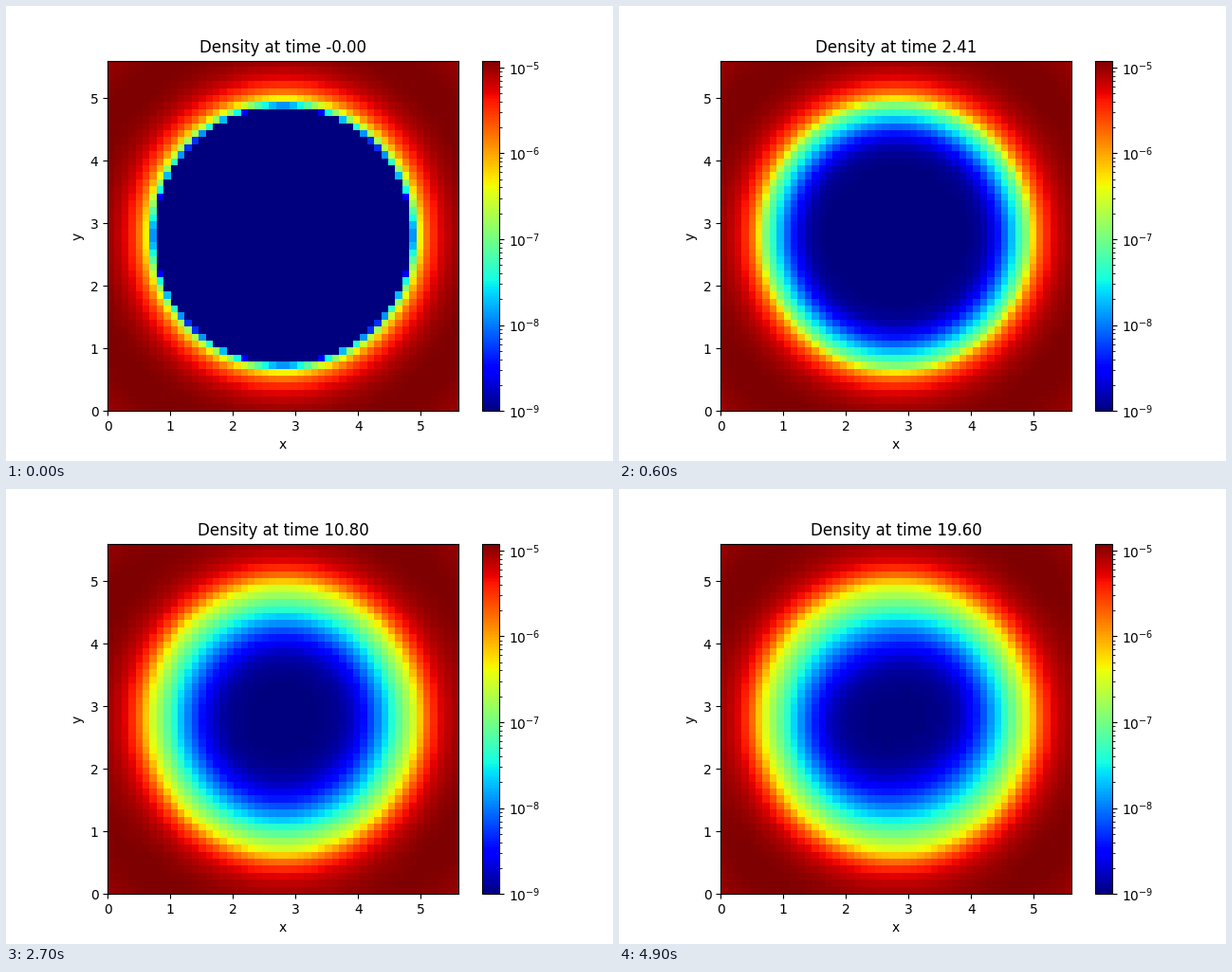
Animation, 640 px wide and 480 px high, one loop 5 s. Source, as a matplotlib script:

```python
import numpy as np
import matplotlib.pyplot as plt
from matplotlib.animation import FuncAnimation
from matplotlib.colors import LogNorm

SIZE, CELLS, FRAMES = 5.6, 50, 50
FLOOR, PEAK = 1e-9, 1.2e-5
R_IN, R_PEAK = 2.033, 3.27          # inner edge and pressure maximum of the torus
R_EDGE, CELL = 2.072, SIZE / CELLS
STEP = 0.4 / 25.5915                # solver time step

# Time, log density at the inner edge, and its inward drop per cell
TIMES = [0, 0.4, 0.81, 2.41, 5.61, 10.8, 15.61, 19.6]
EDGE_LOG = [-14, -7.30, -7.16, -6.96, -6.67, -6.55, -6.52, -6.51]
DROP = [0.50, 0.48, 0.43, 0.40, 0.335, 0.289, 0.275, 0.2675]

axis = (np.arange(CELLS) + 0.5) * CELL - SIZE / 2
X, Y = np.meshgrid(axis, axis)
R, THETA = np.hypot(X, Y), np.arctan2(Y, X)


def potential(r):
    return 1 / r - R_PEAK / (2 * r**2)


def torus():
    depth = (potential(R) - potential(R_IN)) / (potential(R_PEAK) - potential(R_IN))
    return PEAK * np.clip(depth, 0, 1) ** 3


TORUS = torus()


def sim_time(n):
    """Time of the first solver step at or after each output time."""
    return np.ceil(0.4 * n / STEP - 1e-9) * STEP


def density(t):
    # Material leaking inwards, slightly stretched along a tilted axis
    inward = np.maximum((R_EDGE - R) / CELL, -1)
    log_leak = np.interp(t, TIMES, EDGE_LOG) - np.interp(t, TIMES, DROP) * inward
    stretch = 0.2 * (t / 20) ** 2 * np.clip(R_EDGE - R, 0, 1)
    log_leak -= stretch * np.cos(2 * (THETA - np.radians(20)))

    # Four slowly turning dense patches in the outer disc
    turn = np.radians(57 - 0.4 * t)
    thinning = 0.05 * min(t / 12, 1) * np.clip((R - 2.5) / 0.5, 0, 1)
    outer = TORUS * 10 ** (-thinning * np.sin(2 * (THETA - turn + np.pi / 2)) ** 2)
    return FLOOR + np.hypot(outer, 10**log_leak)


fig, ax = plt.subplots(figsize=(6.4, 4.8), dpi=100)
image = ax.imshow(density(0), origin="lower", extent=(0, SIZE, 0, SIZE),
                  cmap="jet", norm=LogNorm(FLOOR, PEAK), interpolation="nearest")
fig.colorbar(image, ax=ax)
ax.set_xlabel("x")
ax.set_ylabel("y")
title = ax.set_title("Density at time 0.00")


def update(n):
    t = sim_time(n)
    image.set_data(density(t))
    title.set_text(f"Density at time {t:.2f}")
    return image, title


animation = FuncAnimation(fig, update, frames=FRAMES, interval=100,
                          repeat=True, repeat_delay=0, blit=False)
plt.show()
```
